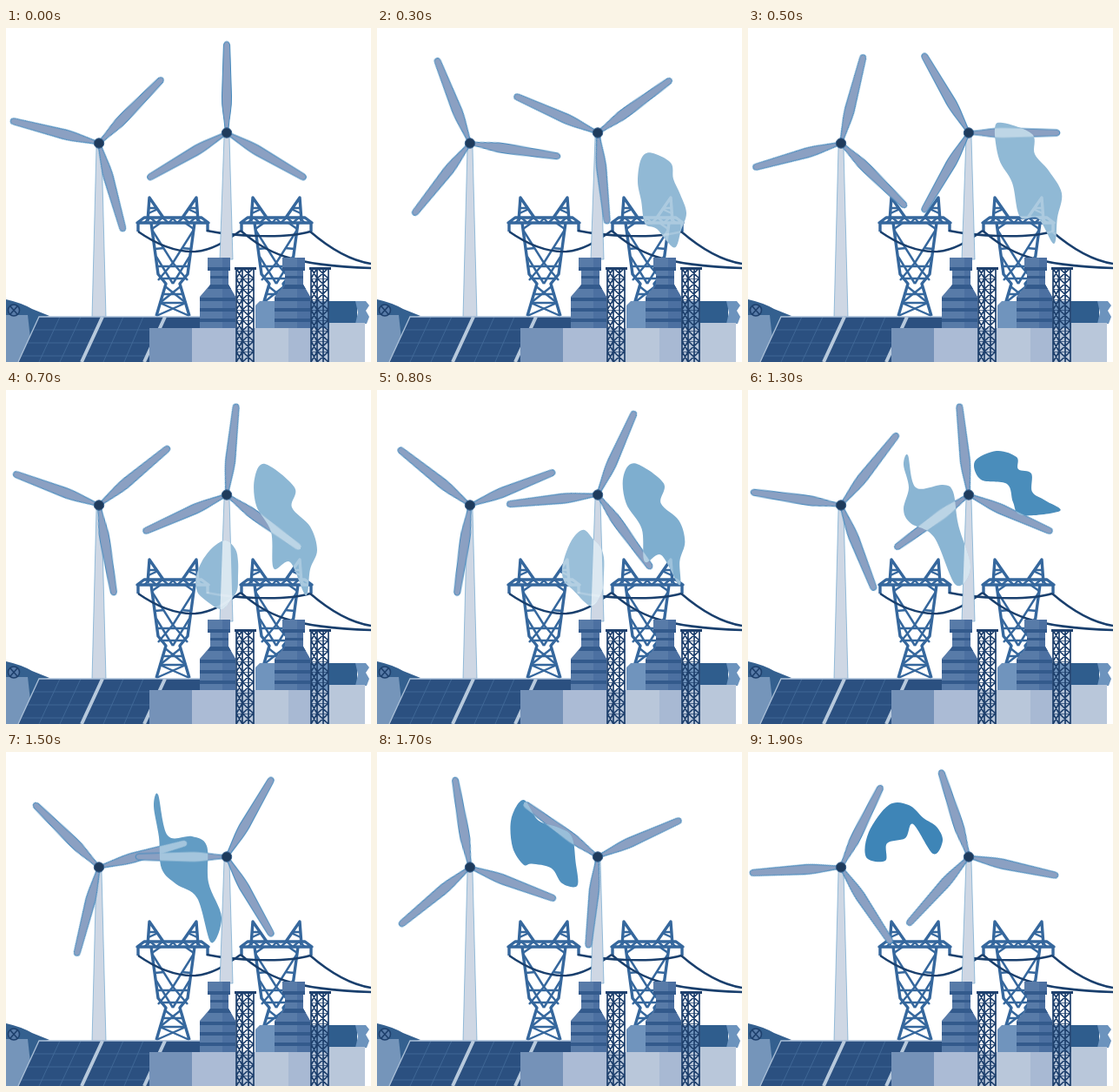
Animation, 420 px wide and 384 px high, one loop 2 s. Source, as an HTML page:

```html
<!DOCTYPE html>
<html lang="en">
<head>
<meta charset="utf-8">
<title>Clean energy</title>
<style>
html, body { margin: 0; width: 100%; height: 100%; overflow: hidden; background: #fff; }
svg { display: block; width: 100%; height: 100%; }
.spin { animation: spin 2s steps(20) infinite; transform: rotate(var(--from)); }
.west { --from: 44.4deg; }
.east { --from: 0deg; }
@keyframes spin {
  from { transform: rotate(var(--from)); }
  to { transform: rotate(calc(var(--from) + 360deg)); }
}
</style>
</head>
<body>
<svg viewBox="0 0 420 384">
  <defs>
    <path id="blade" d="M-2-5C-3-18-6-30-5.5-42L-3.6-101Q-3-105 0-105Q3-105 3.6-101L5.5-42C6-30 3-18 2-5Z"/>
    <g id="blades">
      <use href="#blade"/>
      <use href="#blade" transform="rotate(120)"/>
      <use href="#blade" transform="rotate(240)"/>
    </g>
    <g id="towers">
      <path d="M104 137H110L115 332H99Z"/>
      <path d="M251 125H257L261 266H246Z"/>
    </g>
    <g id="halfPylon" fill="none" stroke-linejoin="round">
      <path stroke-width="3.4" d="M192 218H159L151 224H192M152 224V234M163 222L165 195L181 218M167 224L175 283L184 294L173 331"/>
      <path stroke-width="2.4" d="M159 224L166 218L173 224L180 218L187 224L192 219M164 207H172M164 213L175 208"/>
      <path stroke-width="2.4" d="M168 231L178 224M168 232L192 270L175 290M171 254L182 253M173 263L192 294M174 274H192M177 288H192M183 297L207 316M179 306H192M177 316H192M177 316L211 331"/>
    </g>
    <g id="pylon">
      <use href="#halfPylon"/>
      <use href="#halfPylon" transform="matrix(-1 0 0 1 384 0)"/>
    </g>
    <g id="pylons">
      <use href="#pylon"/>
      <use href="#pylon" x="119"/>
    </g>
    <g id="wires" fill="none" stroke-width="2.4">
      <path d="M152 234C175 250 197 258 218 257C240 255 255 243 270 233"/>
      <path d="M231 233C260 239 320 243 350 234"/>
      <path d="M270 233C300 258 325 273 420 276M350 234C372 253 394 267 420 271"/>
    </g>
    <g id="chimney">
      <path fill="#587ba8" d="M232 264H258V276H256V295L264 309V345H223V309L235 295V276H232Z"/>
      <path fill="#4c70a1" d="M249 264H258V276H256V295L264 309V345H249Z"/>
      <path fill="#335a8c" d="M232 275H258V279H232ZM235 285H256V288H235ZM235 295H256L259 300H232ZM223 310H264V314H223ZM223 322H264V326H223ZM223 334H264V338H223Z"/>
    </g>
    <pattern id="truss" width="24" height="12" patternUnits="userSpaceOnUse" patternTransform="translate(263 276)">
      <path d="M2 0V12M9 0V12M16 0V12M22 0V12M2 0L9 12M9 0L2 12M9 0L22 12M22 0L9 12M2 0H22" fill="none" stroke="#1e406d" stroke-width="1.7"/>
    </pattern>
    <g id="lattice">
      <path fill="url(#truss)" d="M263 276H287V384H263Z"/>
      <path fill="#1e406d" d="M263 275H288V278H263Z"/>
    </g>
    <clipPath id="inSmoke"><path data-smoke="0"/><path data-smoke="1"/></clipPath>
  </defs>

  <use href="#pylons" stroke="#35679d"/>
  <use href="#wires" stroke="#193f6d"/>

  <use href="#towers" fill="#ced7e4" stroke="#5c9ac8" stroke-width=".6"/>
  <g fill="#8ba0c2" stroke="#4389bd" stroke-width="1">
    <g transform="translate(107 132.5)"><use class="spin west" href="#blades"/></g>
    <g transform="translate(254 120.5)"><use class="spin east" href="#blades"/></g>
  </g>

  <path data-smoke="0"/>
  <path data-smoke="1"/>
  <!-- structures glow faintly through the smoke -->
  <g clip-path="url(#inSmoke)" fill="#fff">
    <use href="#pylons" stroke="#fff" opacity=".25"/>
    <use href="#wires" stroke="#fff" opacity=".2"/>
    <use href="#towers" opacity=".65"/>
    <g opacity=".42">
      <g transform="translate(107 132.5)"><use class="spin west" href="#blades"/></g>
      <g transform="translate(254 120.5)"><use class="spin east" href="#blades"/></g>
    </g>
  </g>
  <g fill="#1f3b5c" stroke="#35608d">
    <circle cx="107" cy="132.5" r="5.7"/>
    <circle cx="254" cy="120.5" r="5.7"/>
  </g>

  <!-- dam -->
  <path fill="#34608f" d="M0 312Q18 316 30 323L50 331L38 334L25 362V330H0Z"/>
  <path fill="#7595ba" d="M0 330H25L28 357L14 384H0Z"/>
  <g fill="none" stroke="#1e406d" stroke-width="1.6">
    <circle cx="9" cy="324.5" r="6.5" fill="#587ba8"/>
    <path d="M5 320L13 329M13 320L5 329"/>
  </g>

  <!-- solar panels -->
  <path fill="#2b5080" d="M38 332H225V384H14Z"/>
  <path fill="none" stroke="#456c9b" stroke-width=".8" d="M31 347H180M24 362H170M17 377H170M62 332L38 384M86 332L62 384M135 332L112 384M158 332L136 384"/>
  <path fill="none" stroke="#a9bfd7" stroke-width="1.3" d="M14 384L38 332H225"/>
  <path fill="none" stroke="#b7c9dc" stroke-width="4" d="M111 332L87 384M183 332L159 384"/>

  <!-- power plant -->
  <path fill="#7094bd" d="M292 314H374V345H287V319Z"/>
  <path fill="#2f5d8d" d="M372 314H404V340H372Z"/>
  <path fill="#6c93bd" d="M402 314H414L418 319L414 325L418 332L415 340H402L405 327Z"/>
  <path fill="#7592b8" d="M165 345H214V384H165Z"/>
  <path fill="#abbbd5" d="M214 345H264V384H214Z"/>
  <path fill="#b9c7da" d="M264 345H372V339H413V384H264Z"/>
  <path fill="#a8b9d3" d="M325 345H351V384H325Z"/>
  <use href="#chimney"/>
  <use href="#chimney" x="86"/>
  <use href="#lattice"/>
  <use href="#lattice" x="86"/>
</svg>
<script>
const LOOP = 2000, STEP = 100;
const PALE = [171, 202, 223], DEEP = [62, 133, 183];

// Each key: time, depth of colour, outline running clockwise.
const westPuff = [
  [700, .23, [253,173, 264,183, 267,197, 267,214, 266,230, 259,241, 247,252, 225,238, 219,228, 219,214, 226,196, 239,180]],
  [1000, 0, [208,136, 219,149, 236,145, 249,149, 251,175, 258,215, 245,241, 226,213, 208,204, 201,188, 202,165, 202,146]],
  [1300, .3, [184,75, 193,112, 224,109, 236,117, 242,155, 256,204, 239,224, 214,169, 187,153, 179,137, 185,112, 179,86]],
  [1500, .67, [175,49, 186,96, 214,97, 231,108, 233,150, 248,190, 236,219, 220,168, 196,152, 179,134, 176,98, 170,62]],
  [1900, 1, [162,61, 185,61, 202,76, 217,86, 224,102, 213,117, 190,83, 181,99, 160,105, 158,125, 136,121, 139,92]]
];

const mix = (a, b, k) => a.map((v, i) => v + (b[i] - v) * k);

// The east puff is born in the same form, over the other chimney.
const [, birthDepth, birthShape] = westPuff[0];
const eastBirth = [100, birthDepth, birthShape.map((v, i) => v + (i % 2 ? 5 : 85))];

const eastPuff = [
  eastBirth,
  [500, .25, [293,109, 327,122, 330,145, 346,164, 361,190, 356,218, 352,248, 334,219, 313,217, 304,178, 289,151, 284,116]],
  [700, .28, [298,85, 332,112, 329,135, 350,157, 358,184, 350,206, 345,236, 327,198, 308,205, 305,163, 288,133, 286,102]],
  [1000, .67, [293,83, 325,97, 322,121, 342,136, 347,155, 345,178, 354,201, 327,173, 308,182, 304,153, 284,125, 278,97]],
  [1300, .89, [286,70, 309,77, 311,91, 326,96, 327,117, 342,127, 359,139, 315,144, 305,129, 298,108, 268,103, 261,82]]
];

// Closed Catmull-Rom curve through a flat x, y list.
function smooth(p) {
  const n = p.length;
  const at = i => p[(i + n) % n];
  let d = `M${p[0]} ${p[1]}`;
  for (let i = 0; i < n; i += 2) {
    const ctrl = (from, before, after) =>
      [0, 1].map(a => at(from + a) + (at(after + a) - at(before + a)) / 6).join(" ");
    d += `C${ctrl(i, i - 2, i + 2)} ${ctrl(i + 2, i + 4, i)} ${at(i + 2)} ${at(i + 3)}`;
  }
  return d + "Z";
}

function pose(keys, t) {
  const next = keys.findIndex(key => key[0] >= t);
  if (next < 0 || t < keys[0][0]) return { d: "", fill: "none" };
  const [t1, depth1, shape1] = keys[next];
  const [t0, depth0, shape0] = keys[Math.max(0, next - 1)];
  const k = t1 > t0 ? (t - t0) / (t1 - t0) : 0;
  const color = mix(PALE, DEEP, depth0 + (depth1 - depth0) * k);
  return { d: smooth(mix(shape0, shape1, k)), fill: `rgb(${color.map(Math.round)})` };
}

const puffs = [eastPuff, westPuff].map((keys, i) => ({
  keys, paths: document.querySelectorAll(`[data-smoke="${i}"]`)
}));

let start;
function draw(now) {
  start ??= now;
  const t = Math.floor(((now - start) % LOOP) / STEP) * STEP;
  for (const { keys, paths } of puffs) {
    const { d, fill } = pose(keys, t);
    paths.forEach(path => {
      path.setAttribute("d", d);
      path.setAttribute("fill", fill);
    });
  }
  requestAnimationFrame(draw);
}
requestAnimationFrame(draw);
</script>
</body>
</html>
```
